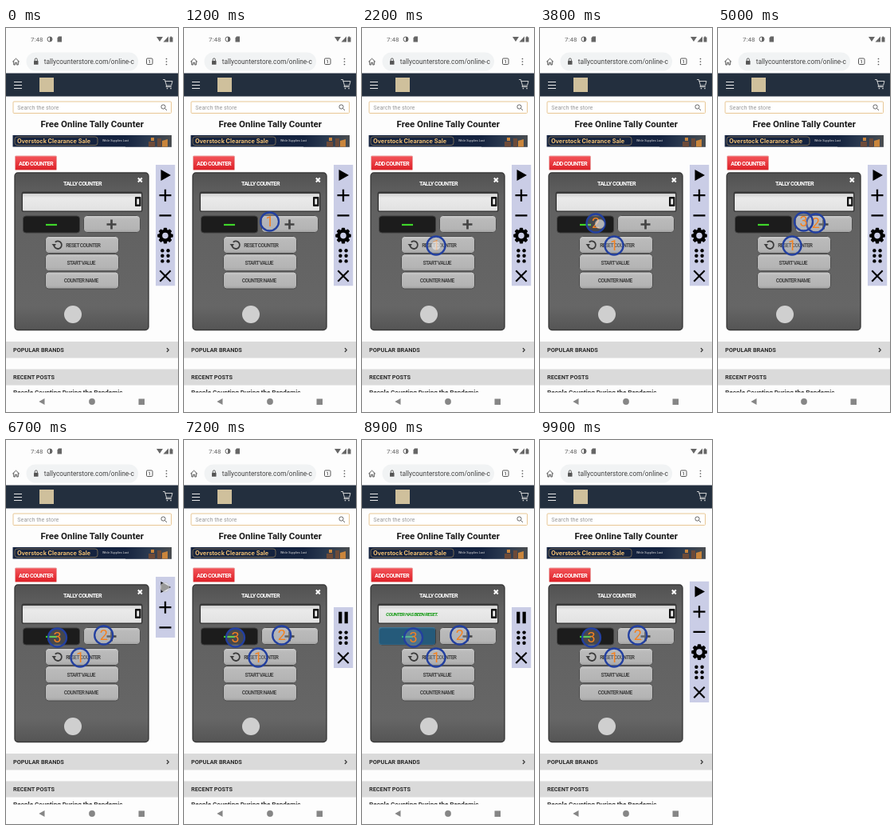
These frames come from a looping animation (216 by 480 pixels, 10 s). An HTML page:

```html
<!DOCTYPE html>
<html lang="en">
<head>
<meta charset="utf-8">
<title>Tally counter</title>
<style>
  html, body { margin: 0; height: 100%; overflow: hidden; background: #fdfdfd; }
  svg { display: block; }
  text { font-family: Roboto, "Liberation Sans", sans-serif; }
  .bold { font-weight: 700; }
  .mid { text-anchor: middle; }
  .key { font-size: 6.6px; font-weight: 700; letter-spacing: -.6px; fill: #444; }
  .line { fill: none; stroke-linecap: round; stroke-linejoin: round; }
</style>
</head>
<body>
<svg id="stage" width="100%" height="100%" viewBox="0 0 216 480">
  <defs>
    <linearGradient id="panel" x2="0" y2="1">
      <stop offset="0" stop-color="#525252"/><stop offset=".15" stop-color="#606060"/>
      <stop offset=".85" stop-color="#666"/><stop offset="1" stop-color="#555"/>
    </linearGradient>
    <linearGradient id="metal" x2="0" y2="1">
      <stop offset="0" stop-color="#cdcdcd"/><stop offset=".2" stop-color="#bababa"/>
      <stop offset=".8" stop-color="#b4b4b4"/><stop offset="1" stop-color="#a2a2a2"/>
    </linearGradient>
    <linearGradient id="lcd" x2="0" y2="1">
      <stop offset="0" stop-color="#cfcfcf"/><stop offset=".25" stop-color="#eaeaea"/><stop offset="1" stop-color="#e2e2e2"/>
    </linearGradient>
    <linearGradient id="red" x2="0" y2="1">
      <stop offset="0" stop-color="#f4555a"/><stop offset="1" stop-color="#dd2027"/>
    </linearGradient>
    <linearGradient id="photo">
      <stop offset="0" stop-color="#15233f"/><stop offset=".5" stop-color="#2b3a50"/><stop offset="1" stop-color="#4a4d50"/>
    </linearGradient>
    <clipPath id="urlClip"><path d="M47 32H161V54H47Z"/></clipPath>
  </defs>
  <path d="M0 0H216V480H0Z" fill="#fdfdfd"/>

  <!-- status bar and browser bar -->
  <g fill="#666">
    <text x="31" y="16.700" font-size="8">7:48</text>
    <circle cx="55" cy="14" r="3" fill="none" stroke="#666"/>
    <path d="M55 11A3 3 0 0 1 55 17Z"/>
    <path d="M66 10.500H70V17.500H64.500V12.500Z"/>
    <path d="M189 11H197L193 17ZM204 10.500V17.500H197.500ZM205.500 11.500H206.500V10.500H208V11.500H209.500V17.500H205.500Z"/>
  </g>
  <path d="M8.500 42L12.500 38.200L16.500 42M9.700 41.500V46H11.500V43.300H13.500V46H15.300V41.500" class="line" stroke="#555"/>
  <rect x="25.500" y="30.500" width="140.500" height="23" rx="11.500" fill="#f1f3f4"/>
  <rect x="35" y="41" width="5.500" height="4.800" rx=".6" fill="#555"/>
  <path d="M36.200 41V39.500A1.500 1.500 0 0 1 39.300 39.500V41" class="line" stroke="#555"/>
  <text x="47.800" y="44.800" font-size="8.300" fill="#444" clip-path="url(#urlClip)">tallycounterstore.com/online-c</text>
  <rect x="176.500" y="38" width="7.500" height="7.500" rx="1.200" fill="none" stroke="#555"/>
  <text x="180.200" y="43.900" font-size="5.800" class="mid bold" fill="#555">1</text>
  <path d="M201.500 38.500V38.500M201.500 42V42M201.500 45.500V45.500" class="line" stroke="#555" stroke-width="1.700"/>

  <!-- shop header -->
  <path d="M0 56.500H216V85.500H0Z" fill="#232f3e"/>
  <path d="M10 67.500H20M10 71.500H20M10 75.500H20" stroke="#e8e8e8"/>
  <rect x="42" y="62" width="18" height="18" fill="#cfc09c"/>
  <path d="M197.500 64.500H199.500L201.500 72H207.500L209 66.500H200M201.500 72L201 73.500H207.500" class="line" stroke="#ddd" stroke-width=".9"/>
  <path d="M202.500 75.500V75.500M207 75.500V75.500" class="line" stroke="#ddd" stroke-width="1.700"/>
  <rect x="9" y="92" width="198.500" height="14.500" rx="1" fill="#fff" stroke="#e8c794"/>
  <text x="14.300" y="102" font-size="7.200" fill="#999">Search the store</text>
  <circle cx="197.500" cy="98.500" r="2.600" fill="none" stroke="#555" stroke-width=".9"/>
  <path d="M199.500 100.500L202 103" stroke="#555" stroke-width=".9"/>
  <text x="108.300" y="124" font-size="11.500" class="mid bold" fill="#1a1a1a">Free Online Tally Counter</text>
  <path d="M8.500 134H208V148.500H8.500Z" fill="#15233f"/>
  <path d="M150 134H208V148.500H150Z" fill="url(#photo)"/>
  <path d="M179 148.500V142H187V148.500ZM190 148.500V138H195V148.500Z" fill="#6d4a38"/>
  <path d="M196 148.500V141L203 139V148.500ZM182 141V137H186V141Z" fill="#c9853c"/>
  <rect x="11" y="136" width="104" height="10.500" rx="3" fill="none" stroke="#8b7a5c" stroke-width=".8"/>
  <text x="14" y="144" font-size="7.300" class="bold" style="font-family: Inter, sans-serif" fill="#f0bf72">Overstock Clearance Sale</text>
  <text x="121" y="142.400" font-size="3.800" fill="#ddd">While Supplies Last</text>

  <!-- counter -->
  <rect x="11.500" y="160" width="52" height="17.500" rx="1" fill="url(#red)" stroke="#e9a0a0"/>
  <text x="37.600" y="171.800" class="mid bold" font-size="7.300" letter-spacing="-.55" fill="#fff">ADD COUNTER</text>
  <rect x="11" y="181" width="168" height="196.500" rx="4" fill="url(#panel)" stroke="#3a3a3a" stroke-width="1.400"/>
  <text x="96" y="196.500" class="mid bold" font-size="7.300" letter-spacing="-.55" fill="#fff">TALLY COUNTER</text>
  <path d="M165.800 187.500L170.800 192.500M170.800 187.500L165.800 192.500" stroke="#fff" stroke-width="2"/>
  <rect x="19.500" y="204.500" width="152" height="25.500" rx="2.500" fill="#3a3a3a"/>
  <rect x="21" y="207" width="149" height="21.500" rx="1" fill="url(#lcd)"/>
  <text id="message" x="30" y="219.800" font-size="6.200" font-weight="700" font-style="italic" letter-spacing="-.55" fill="#149a14">COUNTER HAS BEEN RESET.</text>
  <rect x="162" y="211" width="7.500" height="12" rx=".8" fill="#111"/>
  <rect x="164.300" y="213.500" width="2.900" height="7" fill="#eee"/>
  <rect x="21.500" y="235" width="71" height="21" rx="3.500" fill="#1c1c1c" stroke="#3f3f3f"/>
  <path d="M50 246H64" stroke="#3fd52a" stroke-width="2.200"/>
  <g id="keys"></g>
  <path d="M126.500 245.500H138.500M132.500 239.500V251.500" stroke="#444" stroke-width="2.700"/>
  <path d="M60.300 271.500A4.800 4.800 0 1 0 62.300 267.300" class="line" stroke="#3c3c3c" stroke-width="1.800"/>
  <path d="M57.500 270H63L60.300 273.500Z" fill="#3c3c3c"/>
  <circle cx="84" cy="358" r="11" fill="#cfcfcf"/>
  <g id="taps" fill="#2f97d8" fill-opacity=".5">
    <rect x="49" y="260" width="92" height="22" rx="3"/>
    <rect x="21" y="234" width="71" height="22" rx="3"/>
    <rect x="97" y="234" width="71" height="22" rx="3"/>
  </g>

  <!-- page bottom and navigation -->
  <path d="M0 392H216V412.500H0ZM0 426.500H216V446.500H0Z" fill="#dadada"/>
  <g class="bold" fill="#2a2a2a">
    <text x="9" y="405" font-size="7.350">POPULAR BRANDS</text>
    <text x="9" y="439.300" font-size="7.300">RECENT POSTS</text>
    <text x="9" y="458" font-size="8.050">People Counting During the Pandemic</text>
  </g>
  <path d="M202.300 400.500L204.300 402.500L202.300 404.500" class="line" stroke="#333" stroke-width="1.200"/>
  <path d="M0 455.500H216V480H0Z" fill="#fdfdfd"/>
  <path d="M48.500 463V471L41.300 467Z M166.500 463.500H174V471H166.500Z" fill="#868686"/>
  <circle cx="108" cy="467" r="3.900" fill="#868686"/>

  <svg id="bar" x="188" width="24.500">
    <rect width="100%" height="100%" fill="#cacde6"/>
    <g id="full"></g>
    <g id="short"></g>
  </svg>
  <g id="targets"></g>
  <circle id="dot" r="5.800" fill="#ebebeb" fill-opacity=".65" stroke="#aaa" stroke-opacity=".4"/>
</svg>
<script>
const $ = id => document.getElementById(id);
const show = (el, on) => el.style.display = on ? "" : "none";
const within = (t, a, b) => t >= a && t < b;

// counter keys
const key = (x, y, w, label, tx) =>
  `<rect x="${x}" y="${y}" width="${w}" height="21" rx="4" fill="url(#metal)" stroke="#4d4d4d"/>` +
  `<text class="key mid" x="${tx}" y="${y + 13.3}">${label}</text>`;
$("keys").innerHTML = key(97.5, 234.5, 71, "", 0) + key(49.5, 260.5, 92, "RESET COUNTER", 96.8) +
  key(49.5, 282.7, 92, "START VALUE", 94.2) + key(49.5, 305, 92, "COUNTER NAME", 94.2);

// toolbar icons, each drawn around its own centre
const stroke = (d, w) => `<path d="${d}" stroke="#000" stroke-width="${w}" fill="none"/>`;
const teeth = [...Array(8).keys()].map(i =>
  `<rect x="-2.2" y="-9.800" width="4.400" height="4" rx="1" transform="rotate(${i * 45})"/>`).join("");
const icon = {
  play: `<path d="M-5.500 -7L7 0L-5.500 7Z"/>`,
  plus: stroke("M-7.500 0H7.500M0 -7.500V7.500", 2.3),
  minus: stroke("M-7.500 0H7.500", 2.3),
  gear: teeth + `<circle r="5.800" fill="none" stroke="#000" stroke-width="4"/>`,
  dots: [-6.6, 0, 6.6].map(y => `<circle cx="-3.600" cy="${y}" r="2.200"/><circle cx="3.600" cy="${y}" r="2.200"/>`).join(""),
  close: stroke("M-6.700 -6.700L6.700 6.700M6.700 -6.700L-6.700 6.700", 2.1),
  pause: stroke("M-3.700 -7.300V7.300M3.700 -7.300V7.300", 4.2)
};
const column = names => names.map((n, i) =>
  `<g transform="translate(12 ${13 + i * 25.2})">${icon[n]}</g>`).join("");
$("full").innerHTML = column(["play", "plus", "minus", "gear", "dots", "close"]);
$("short").innerHTML = column(["pause", "dots", "close"]);

// numbered targets: [time, x, y]
const paths = [
  [[1000, 107.5, 242], [1500, 107.5, 242], [1900, 95, 262], [2050, 95, 262], [2200, 93, 272]],
  [[2900, 107.5, 242], [3300, 107.5, 242], [3700, 68, 244], [3800, 70, 244], [4300, 122.7, 244]],
  [[4800, 107.5, 242], [5300, 107.5, 242], [6000, 64.5, 247]]
];
$("targets").innerHTML = paths.map((p, i) =>
  `<g><circle r="11.500" fill="#a9b0bd" fill-opacity=".3" stroke="#2340a0" stroke-width="2.300"/>
   <text class="mid" y="6.300" font-size="18" fill="#f58220">${i + 1}</text></g>`).join("");

function at(path, t) {
  const i = path.findIndex(p => p[0] > t);
  if (i < 0) return path.at(-1).slice(1);
  if (!i) return null;
  const [a, b] = [path[i - 1], path[i]], k = (t - a[0]) / (b[0] - a[0]);
  return [a[1] + (b[1] - a[1]) * k, a[2] + (b[2] - a[2]) * k];
}

// finger presses on the toolbar, and drags of each target
const presses = [[800, 1200, 209], [2700, 3000, 209], [4600, 5000, 209], [6700, 6900, 184]];
const drags = [[1500, 2400], [3300, 4400], [5300, 6100]];

function barState(t) {
  if (t < 6700) return [171, 151.5, true];
  if (t < 9800) return [171 + 38 * Math.min(1, Math.max(0, (t - 6800) / 400)), 76, t < 6900];
  return t < 9900 ? [193, 120, true] : [176.5, 151.5, true];
}

function draw(t) {
  let finger = null;
  for (const [a, b, y] of presses) if (within(t, a, b)) finger = [199.5, y];
  paths.forEach((path, i) => {
    const pos = at(path, t), el = $("targets").children[i];
    show(el, pos);
    if (!pos) return;
    el.setAttribute("transform", `translate(${pos})`);
    if (within(t, ...drags[i])) finger = i ? [pos[0] + 5, pos[1] + 1] : pos;
  });
  show($("dot"), finger);
  if (finger) $("dot").setAttribute("transform", `translate(${finger})`);

  const [y, h, full] = barState(t);
  $("bar").setAttribute("y", y);
  $("bar").setAttribute("height", h);
  show($("full"), full);
  show($("short"), !full);

  show($("message"), within(t, 7900, 9100));
  [[7900, 8100], [8900, 9100], [9300, 9500]].forEach((span, i) => show($("taps").children[i], within(t, ...span)));
}

const start = performance.now();
function tick() {
  const t = (performance.now() - start) % 10000;
  draw(Math.floor(t / 100) * 100);
  requestAnimationFrame(tick);
}
tick();
</script>
</body>
</html>
```
